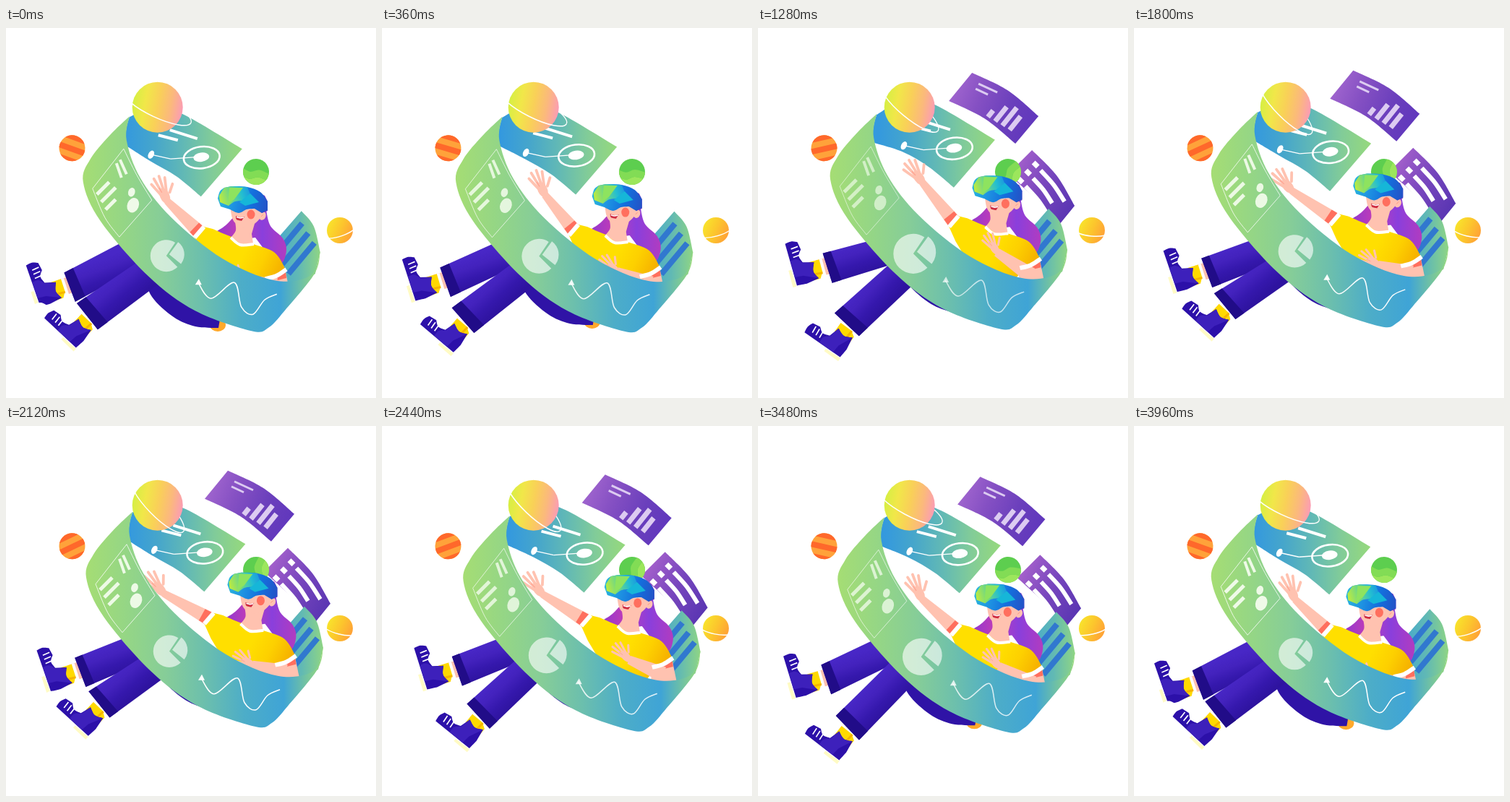
These frames come from a looping animation (512 by 512 pixels, 4 s). An HTML page with a canvas:

```html
<!DOCTYPE html>
<html lang="en">
<head>
<meta charset="utf-8">
<title>Virtual reality</title>
<style>
html, body { margin: 0; width: 100%; height: 100%; overflow: hidden; background: #fff; }
canvas { display: block; width: 100%; height: 100%; }
</style>
</head>
<body>
<canvas id="stage" width="512" height="512"></canvas>
<script>
const c = document.getElementById('stage').getContext('2d');
const LOOP = 4000, DEG = Math.PI / 180;
const SKIN = '#ffc2b0', BLUSH = '#ff6f5e';

// Every pose mixes a slow circular sway with a kick at twice its pace.
let now, swayX, swayY, kick, skew;
function setTime(t) {
  now = t % LOOP;
  const a = 2 * Math.PI * now / LOOP;
  swayX = Math.sin(a);
  swayY = Math.cos(a);
  kick = (1 - Math.cos(2 * a)) / 2;
  skew = Math.sin(2 * a);
}

const clamp = x => Math.max(0, Math.min(1, x));
function pop(inAt, outAt) {
  const a = clamp((now - inAt) / 460), b = clamp((now - outAt) / 420);
  return (1 - (1 - a) ** 2) * (1 - b * b);
}

function grad(x1, y1, x2, y2, ...stops) {
  const g = c.createLinearGradient(x1, y1, x2, y2);
  stops.forEach((s, i) => g.addColorStop(i / (stops.length - 1), s));
  return g;
}

function run(p, first) {
  const n = p.length / 2;
  const X = i => p[2 * Math.max(0, Math.min(n - 1, i))];
  const Y = i => p[2 * Math.max(0, Math.min(n - 1, i)) + 1];
  first ? c.moveTo(p[0], p[1]) : c.lineTo(p[0], p[1]);
  for (let i = 0; i < n - 1; i++) {
    c.bezierCurveTo(
      X(i) + (X(i + 1) - X(i - 1)) / 6, Y(i) + (Y(i + 1) - Y(i - 1)) / 6,
      X(i + 1) - (X(i + 2) - X(i)) / 6, Y(i + 1) - (Y(i + 2) - Y(i)) / 6,
      X(i + 1), Y(i + 1));
  }
}

// Each run is smooth; runs meet at corners.
function shape(fill, ...runs) {
  c.beginPath();
  runs.forEach((r, i) => run(r, !i));
  c.closePath();
  c.fillStyle = fill;
  c.fill();
}

function poly(fill, ...p) {
  c.beginPath();
  for (let i = 0; i < p.length; i += 2) c.lineTo(p[i], p[i + 1]);
  c.closePath();
  c.fillStyle = fill;
  c.fill();
}

function line(color, width, p, cap = 'butt') {
  c.beginPath();
  run(p, true);
  c.lineCap = cap;
  c.lineWidth = width;
  c.strokeStyle = color;
  c.stroke();
}

function oval(fill, x, y, rx, ry = rx, rot = 0) {
  c.beginPath();
  c.ellipse(x, y, rx, ry, rot * DEG, 0, 7);
  c.fillStyle = fill;
  c.fill();
}

function arc(x, y, rx, ry, rot, a, b, width) {
  c.beginPath();
  c.ellipse(x, y, rx, ry, rot * DEG, a, b);
  c.lineWidth = width;
  c.strokeStyle = '#fff';
  c.stroke();
}

function group(x, y, draw, rot = 0, scale = 1) {
  c.save();
  c.translate(x, y);
  c.rotate(rot * DEG);
  c.scale(scale, scale);
  draw();
  c.restore();
}

// Scales a drawing about a fixed point.
function grow(x, y, scale, draw) {
  if (scale > 0) group(x, y, () => { c.translate(-x, -y); draw(); }, 0, scale);
}

function limb(fill, x1, y1, w1, x2, y2, w2) {
  const d = Math.hypot(x2 - x1, y2 - y1), nx = (y1 - y2) / d, ny = (x2 - x1) / d;
  poly(fill, x1 + nx * w1, y1 + ny * w1, x2 + nx * w2, y2 + ny * w2,
    x2 - nx * w2, y2 - ny * w2, x1 - nx * w1, y1 - ny * w1);
}

function hand(x, y, rot, scale) {
  group(x, y, () => {
    oval(SKIN, 8, 0, 12, 7);
    for (let i = 0; i < 5; i++) {
      const a = i < 4 ? (i - 1.6) * .22 : .72, len = i < 4 ? 38 - 2 * (i - 1.6) ** 2 : 26;
      line(SKIN, 4, [10, a * 12, Math.cos(a) * len, Math.sin(a) * len], 'round');
    }
    line('#ff9d8b', 1, [14, -2, 22, -3]);
  }, rot, scale);
}

function rearPanel(dx, dy) {
  shape(grad(166 + dx, 0, 327 + dx, 0, '#3499de', '#46a6cb', '#62b9b5', '#82cc98', '#96d97c'),
    [164, 161, 167, 137, 171, 123],
    [171, 123, 205 + dx, 109 + dy, 245 + dx, 119 + dy, 327 + dx, 167 + dy],
    [270 + dx, 233 + dy, 236 + dx, 205 + dy, 200 + dx, 184 + dy, 164, 161]);
  group(dx, dy, () => {
    line('#fff', 4, [211, 148, 238, 155]);
    line('#fff', 4, [227, 141, 265, 153]);
    line('#fff', 1.3, [201, 175, 228, 181]);
    line('#fff', 1.3, [228, 181, 270, 178]);
    oval('#fff', 201, 175, 3.8, 6, 28);
    oval('#fff', 270.5, 178.5, 11, 6.3, -8);
    arc(271, 179, 25, 15, -7, 0, 7, 2.6);
  });
}

function chartPanel() {
  const pale = '#dccbf1';
  shape(grad(271, 85, 395, 140, '#a468d0', '#8550c3', '#6a3fbc', '#5f36bd'),
    [303, 65, 352, 89, 395, 125], [363, 163, 320, 128, 271, 104]);
  line(pale, 3, [312, 80, 338, 92]);
  line(pale, 3, [308, 87, 325, 95]);
  [9, 20, 25, 19].forEach((h, i) => {
    const x = 325 + i * 10, y = 126 + i * 6;
    line(pale, 7, [x, y, x + h * .8, y - h]);
  });
}

function tablePanel() {
  shape(grad(355, 200, 445, 250, '#a661cc', '#7746bd', '#5935b2'),
    [386, 172, 420, 207, 445, 249], [423, 276, 390, 239, 353, 205]);
  for (let i = 0; i < 3; i++) {
    const x = 389 - i * 10.5, y = 190 + i * 11, len = i === 1 ? .8 : 1;
    line('#fff', 7, [x - 1, y - 1, x + 5, y + 5]);
    line('#fff', 6, [x + 9, y + 10, x + 9 + 18 * len, y + 10 + 20 * len, x + 9 + 33 * len, y + 10 + 43 * len]);
  }
}

function innerWall() {
  shape(grad(375, 0, 435, 0, '#46a9ce', '#61b9b4', '#8fd584'),
    [409, 253, 426, 274, 435, 310], [428, 340, 400, 355, 368, 347], [368, 300]);
  for (let i = 0; i < 3; i++) {
    const x = 410 + i * 8.5, y = 270 + i * 13.5;
    line('#3178cf', 8, [x, y, x - 36, y + 43]);
  }
}

function band() {
  shape(grad(107, 0, 435, 0, '#a5dd74', '#95d685', '#86cd98', '#6cbfad', '#4dadc8', '#3fa4d6', '#9bdb78'),
    [171, 122, 144, 148, 117, 181, 107, 213, 131, 267, 197, 343, 262, 391, 340, 419, 364, 414, 385, 392],
    [385, 392, 427, 340, 435, 308],
    [435, 308, 422, 342, 372, 349, 300, 319, 229, 262, 186, 207, 167, 155, 171, 122]);

  c.save();
  c.globalAlpha = 1 - .4 * kick;
  const pale = '#effae8';
  c.lineWidth = 1;
  c.strokeStyle = 'rgba(255,255,255,.8)';
  c.beginPath();
  run([163, 167, 181, 203, 202, 238], true);
  run([157, 289, 137, 262, 120, 222]);
  c.closePath();
  c.stroke();
  line(pale, 4, [153, 187, 160, 207]);
  line(pale, 4, [158, 182, 167, 202]);
  [17, 20, 14].forEach((w, i) => line(pale, 5, [126 + i * 6, 230 + i * 10.5, 126 + i * 6 + w, 230 + i * 10.5 - w]));
  oval(pale, 174, 227, 4.7, 6.3, 18);
  oval(pale, 176, 245, 8, 10.5, 22);
  line('#fff', 1.5, [266, 352, 284, 374, 316, 352, 326, 386, 342, 396, 358, 376, 375, 368]);
  poly('#fff', 267, 347, 262, 355, 271, 355);
  c.restore();

  grow(223, 314, 1 + .31 * kick, () => {
    slice(222, 315, 22, 45, 304);
    slice(226, 313, 21, -54, 39);
  });
}

function slice(x, y, r, from, to) {
  c.beginPath();
  c.moveTo(x, y);
  c.arc(x, y, r, from * DEG, to * DEG);
  c.fillStyle = 'rgba(255,255,255,.62)';
  c.fill();
}

// The heel is the origin; the sole runs along the negative x axis.
function shoe() {
  poly(SKIN, -28, -40, -5, -40, -5, -62, -28, -62);
  poly('#fff', -28, -42, -4, -42, -4, -49, -28, -49);
  poly('#ffd900', -28, -30, -2, -30, -2, -40, -10, -45, -28, -45);
  line('#f6b400', 3, [-10, -32, -9, -45]);
  shape('#fff', [0, 0, -80, 0], [-80, 0, -84, -9, -78, -18, -61, -22], [-30, -24, 0, -22]);
  poly('#fffbc4', 0, 0, -24, 0, -24, -4, 0, -5);
  shape('#2c10a9', [-61, -5, -62, -14, -59, -22], [-48, -24, -40, -19, -30, -22],
    [-26, -37, -14, -33, -3, -38], [0, -20, -1, -6]);
  shape('#3d20bb', [-36, -6, -36, -15, -29, -22], [-26, -37, -14, -33, -3, -38], [-12, -18, -13, -6]);
  for (let x = -53; x < -38; x += 6) line('#fff', 1.7, [x, -21, x + 1, -11]);
}

// The cuff is fixed to the shoe; the hip end stays hidden behind the band.
function leg(x, y, rot, cuff, hip) {
  group(x, y, shoe, rot);
  const cos = Math.cos(rot * DEG), sin = Math.sin(rot * DEG);
  const place = (u, v) => [x + u * cos - v * sin, y + u * sin + v * cos];
  const [px, py] = place(cuff[0], cuff[1]), [qx, qy] = place(cuff[2], cuff[3]);
  const [ax, ay, bx, by] = hip;
  const mix = (a, b) => a + (b - a) * .13;
  poly(grad(px, py, qx, qy, '#4827c6', '#4322bd', '#3518ad', '#2e139f'), px, py, ax, ay, bx, by, qx, qy);
  poly('#210c88', px, py, mix(px, ax), mix(py, ay), mix(qx, bx), mix(qy, by), qx, qy);
}

function legs() {
  leg(49 - 7 * swayY - 4 * swayX, 379 + 9 * swayY - 3 * swayX - 16.5 * kick, 71.8 + 4 * kick,
    [-35, -52, 8, -54], [175, 289, 202, 322]);
  leg(101 - 7.5 * swayY - 7 * swayX + 16 * kick, 439.5 + 8 * swayY - 5 * swayX + 36 * kick, 44 - 10 * kick,
    [-43, -51, 3, -45], [195, 315, 233, 338]);
}

function hips() {
  oval('#ffa92b', 293, 411, 11, 9);
  shape('#2f13a6', [190, 340, 202, 372, 232, 400, 262, 413, 294, 415], [300, 380]);
}

function hair() {
  shape(grad(288, 0, 388, 0, '#8d39d2', '#c03bb7', '#8a3fdc', '#b13cc0'),
    [318, 258, 304, 273, 288, 284, 287, 290, 318, 293, 345, 290],
    [360, 310, 380, 326, 388, 308, 383, 291, 366, 274, 360, 252], [348, 240]);
}

function raisedArm() {
  const angle = (-143 + 8 * swayX + 7 * swayY + 12 * kick) * DEG, reach = 68 - 5 * swayY;
  const at = k => [268 + Math.cos(angle) * reach * k, 283 + Math.sin(angle) * reach * k];
  limb(SKIN, ...at(1), 5, ...at(0), 10);
  limb(BLUSH, ...at(.16), 9, ...at(0), 9.5);
  hand(...at(1), -122 + 9 * swayY, .95);
}

function torso() {
  shape(grad(335, 300, 385, 325, '#ffdf00', '#fdd000', '#f6b200'),
    [261, 290, 274, 275], [286, 278, 312, 289, 342, 299, 372, 311, 388, 336],
    [363, 349], [345, 372], [300, 360], [270, 310]);
  shape(SKIN, [317, 268, 318, 280, 312, 289], [325, 299, 342, 298], [340, 285, 346, 264]);
  line('#fff', 4, [311, 290, 324, 300, 343, 299]);
  line('#fff', 6, [261, 290, 274, 275]);
}

function foldedArm() {
  const x = 327, y = 348 - 28 * kick;
  poly(SKIN, 360, 348, 387, 338, 394, 372, 356, 372);
  poly(BLUSH, 360, 348, 387, 338, 388, 346, 372, 350);
  limb(SKIN, x, y, 6, 374, 357, 11);
  hand(x, y, -148 + 34 * kick, .78);
  line('#fff', 6, [359, 347, 374, 343, 388, 334]);
}

function head() {
  shape(SKIN, [310, 244, 313, 263, 320, 272, 332, 276, 345, 270, 356, 258], [358, 240]);
  oval(SKIN, 355, 260, 4.5, 6, 20);
  line('#ff8f7d', 1, [353, 261, 356, 258]);
  oval(BLUSH, 339, 258, 5.5, 6.5);
  shape('#cf2c42', [318, 260, 324, 262, 330, 261], [326, 267, 319, 265, 318, 260]);
  line('#fff', 1.6, [319, 261.5, 324, 263, 329, 262]);
  poly('#7135c6', 345, 226, 358, 232, 362, 240, 362, 253, 354, 256, 343, 244);
  shape(grad(294, 230, 362, 245, '#2bb7dc', '#1e93e2', '#146fdd', '#2353c7'),
    [293, 236, 296, 226, 302, 221], [312, 219, 334, 220, 352, 227, 362, 240], [362, 252, 354, 256],
    [344, 250, 333, 251, 322, 256, 310, 251], [297, 247]);
  shape(grad(296, 235, 340, 222, '#b9ea43', '#6bd687', '#23bed1', '#1a8ee2'),
    [295, 232, 302, 221], [312, 219, 334, 220], [338, 230], [329, 239, 317, 240, 308, 246], [296, 241]);
  poly('#8ee35f', 309, 221, 328, 221, 316, 237, 307, 244);
  poly('#16b6d8', 338, 229, 350, 241, 331, 246, 323, 241);
}

function bigPlanet() {
  const rot = 35.5 - 10.5 * swayY, x = 209.7, y = 109.7;
  arc(x, y, 51, 14, rot, Math.PI, 2 * Math.PI, 1.3);
  oval(grad(x - 35, y - 6, x + 35, y + 6, '#d5ef43', '#f1e749', '#f9d058', '#fbb97c', '#fb9bb7'), x, y, 35);
  arc(x, y, 51, 14, rot, 0, Math.PI, 1.5);
}

function disc(x, y, rot, base, draw) {
  group(x, y, () => {
    c.beginPath();
    c.arc(0, 0, 18, 0, 7);
    c.clip();
    c.fillStyle = base;
    c.fillRect(-20, -20, 40, 40);
    draw();
  }, rot);
}

function orangePlanet() {
  disc(91.5, 166.3, -3 + 23 * swayY, '#ffa23a', () => {
    c.fillStyle = '#ff682b';
    for (let y = -19; y < 20; y += 16) c.fillRect(-20, y, 40, 8);
  });
}

function greenPlanet() {
  disc(346, 199, -36 + 44 * swayY, '#5dce4f', () => {
    shape('#9ce65c', [-20, 7, -8, 11, 4, 7, 20, 11], [20, 20, -20, 20]);
    shape('#82dc55', [-20, -3, -8, 1, 4, -3, 20, 1], [20, 11, 4, 7, -8, 11, -20, 7]);
  });
}

function yellowPlanet() {
  oval(grad(444, 272, 480, 288, '#f8e52b', '#fcc52d', '#ff9e38'), 462, 280, 18);
  arc(462, 280, 25, 8, -2 - 17 * swayY, 0, Math.PI, 1.4);
}

function draw() {
  c.fillStyle = '#fff';
  c.fillRect(0, 0, 512, 512);
  const ring = [1.3 - 7 * swayX - 1.5 * swayY - 3 * kick,
    -2.3 - 4 * swayX + 2.5 * swayY + 6.3 * kick + 1.4 * skew];
  const body = [6.2 * (1 - swayY) - 6 * swayX, -8.5 * (1 - swayY) - 3 * swayX];

  group(...ring, () => {
    rearPanel(9.5 * kick, -11.5 * kick);
    grow(333, 114, pop(460, 3420), chartPanel);
    grow(402, 225, pop(620, 3400), tablePanel);
    innerWall();
  });
  greenPlanet();
  group(body[0], body[1] * 1.4, hips);
  legs();
  group(...body, () => {
    hair();
    raisedArm();
    torso();
    foldedArm();
    head();
  });
  group(...ring, band);
  bigPlanet();
  orangePlanet();
  yellowPlanet();
}

function tick(t) {
  setTime(t);
  draw();
  requestAnimationFrame(tick);
}
tick(0);
</script>
</body>
</html>
```
